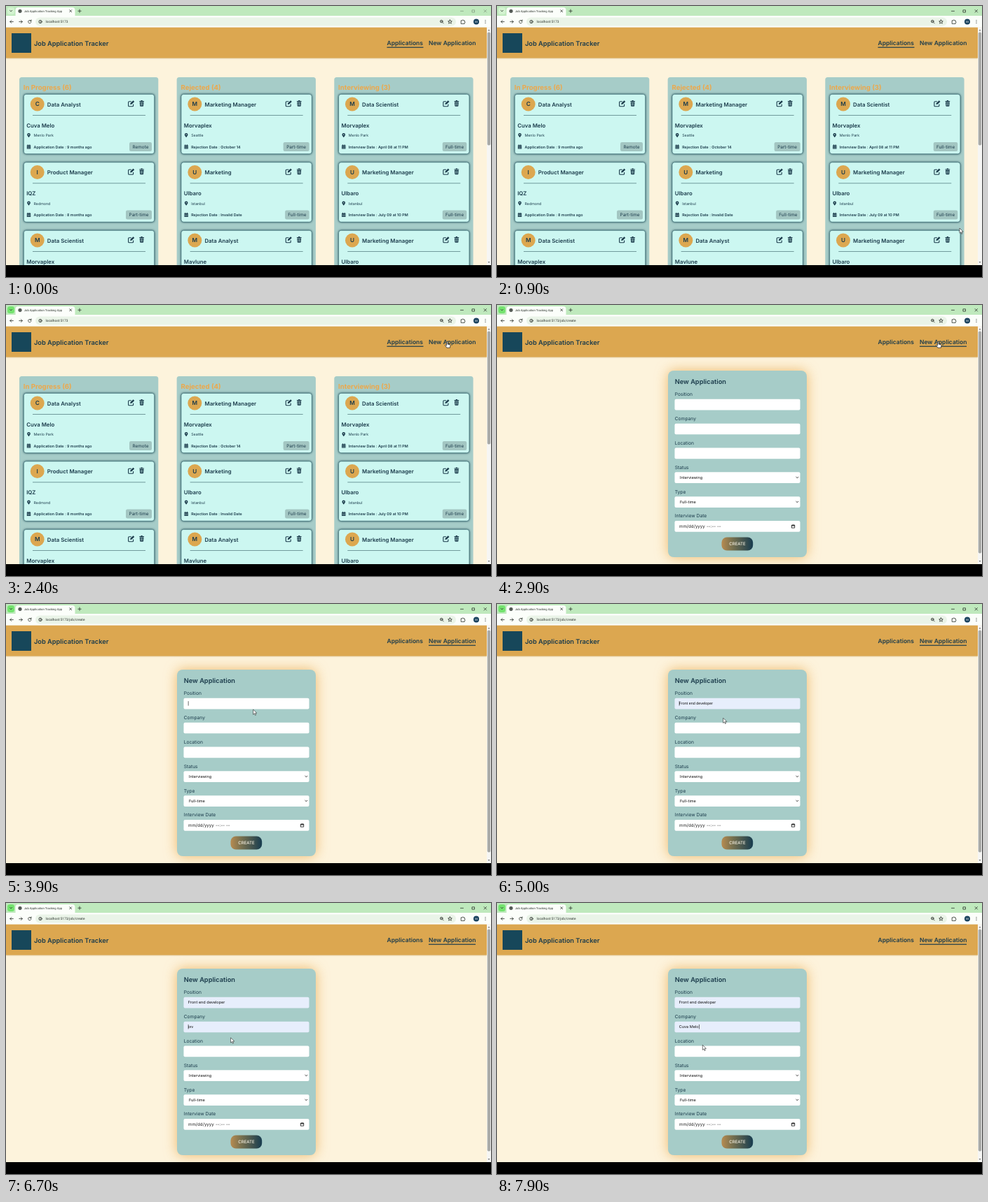
Write an HTML page that moves like this. It is 692 px wide and 388 px high and loops after 8000 ms.

```html
<!DOCTYPE html>
<html lang="en">
<head>
<meta charset="utf-8">
<title>Job Application Tracking App</title>
<style>
  html, body { margin: 0; width: 100%; height: 100%; overflow: hidden; background: #000; }
  svg { display: block; width: 100%; height: 100%; }
  text { font-family: Inter, "Open Sans", sans-serif; fill: #1b3b4b; text-rendering: geometricPrecision; white-space: pre; }
  .chrome { font-family: Roboto, Arial, sans-serif; fill: #2c332d; }
  .title { font-size: 9.25px; font-weight: 600; }
  .nav { font-size: 8.5px; font-weight: 600; }
  .column { font-size: 9.65px; font-weight: 700; fill: #eda84b; }
  .name { font-size: 7.8px; font-weight: 600; }
  .place { font-size: 5.3px; }
  .date { font-size: 5.4px; font-weight: 600; }
  .badge { font-size: 6.35px; text-anchor: middle; }
  .initial { font-size: 8.2px; font-weight: 600; text-anchor: middle; }
  .label { font-size: 6.7px; }
  .value { font-size: 5.55px; fill: #111; }
  .preview { font-family: "Liberation Sans", Arial, sans-serif; font-size: 5.4px; }
  .hint { font-size: 6.2px; fill: #222; }
  .create { font-size: 6.1px; font-weight: 500; fill: #f6f1e4; text-anchor: middle; }
  .card { fill: #ccf7f1; stroke: #3b6a72; stroke-width: .7; filter: drop-shadow(0 0 1.6px #1f4a55); }
  .panel { fill: #a6ccc8; }
  .glow { filter: drop-shadow(0 0 9px rgba(232, 166, 70, .75)); }
  .line { fill: none; stroke: #2c332d; stroke-width: .8; stroke-linecap: round; stroke-linejoin: round; }
</style>
</head>
<body>
<svg id="stage" viewBox="0 0 692 388" preserveAspectRatio="none"></svg>
<script>
const LOOP = 8000, STEP = 100;
const NAVY = '#1b3b4b', ORANGE = '#dca750';

const rect = (x, y, w, h, fill, r = 0, more = '') =>
  `<rect x="${x}" y="${y}" width="${w}" height="${h}" rx="${r}" fill="${fill}" ${more}/>`;
const circle = (x, y, r, fill) => `<circle cx="${x}" cy="${y}" r="${r}" fill="${fill}"/>`;
const text = (x, y, cls, str, more = '') => `<text x="${x}" y="${y}" class="${cls}" ${more}>${str}</text>`;
const line = (d, more = '') => `<path class="line" d="${d}" ${more}/>`;
const icon = (id, x, y) => `<use href="#${id}" x="${x}" y="${y}"/>`;

const defs = `<defs>
  <clipPath id="view"><rect y="30" width="686" height="341"/></clipPath>
  <linearGradient id="button"><stop offset="0" stop-color="#b78b50"/><stop offset=".35" stop-color="#76704f"/>
    <stop offset="1" stop-color="#173c4f"/></linearGradient>
  <g id="edit" fill="${NAVY}"><path d="M0-3H-3.2a1 1 0 0 0-1 1v5a1 1 0 0 0 1 1h5a1 1 0 0 0 1-1V.8" fill="none" stroke="${NAVY}" stroke-width="1.1"/>
    <path d="M-1.7 1.4l.5-2L2.7-4.4l1.7 1.7L.4 1z"/></g>
  <g id="trash" fill="${NAVY}"><path d="M-3.3-3.6h2l.4-.8h1.8l.4.8h2v1h-6.6zM-2.9-2.1h5.8l-.4 5.5a.9.9 0 0 1-.9.8h-3.2a.9.9 0 0 1-.9-.8z"/>
    <path d="M-1.3-1v4M0-1v4M1.3-1v4" stroke="#ccf7f1" stroke-width=".5"/></g>
  <g id="pin"><path fill="${NAVY}" d="M0 3.2C-1.2 1.6-2.3.4-2.3-.8a2.3 2.3 0 0 1 4.6 0C2.3.4 1.2 1.6 0 3.2z"/><circle cy="-.8" r=".8" fill="#ccf7f1"/></g>
  <g id="calendar" fill="${NAVY}"><path d="M-2.7-2.3h1v-.9h.8v.9h1.8v-.9h.8v.9h1v1.2h-5.4zM-2.7-.7h5.4v3.7h-5.4z"/>
    <path d="M-2 .5h4M-2 1.8h4" stroke="#ccf7f1" stroke-width=".5" stroke-dasharray="1 .5"/></g>
  <path id="arrow" d="M0 0v7.2l1.7-1.5 1.1 2.6 1.2-.5-1.1-2.6h2.3z" fill="#fff" stroke="#222" stroke-width=".6"/>
  <path id="hand" d="M-.8.6c0-1 1.6-1 1.6 0v3l3 .7c.6.2.8.6.7 1.2l-.5 3.2H-.6L-2.9 5.500c-.4-.7.5-1.200 1.100-.7l1 .9z" fill="#fff" stroke="#111" stroke-width=".7"/>
  <path id="beam" d="M-1.300-4h2.600M0-4v8M-1.300 4h2.600" fill="none" stroke="#222" stroke-width=".7"/>
</defs>`;

const browser = () => rect(0, 0, 692, 15, '#bfe9bd') +
  rect(2, 2, 10, 10, '#d3f3d0', 3) + rect(2, 2, 10, 10, '#74e36f', 3, 'id="tabMenu"') +
  line('M5.5 6.300l1.600 1.500 1.600-1.500') +
  rect(13.5, 2, 85, 15, '#fbfefa', 4) + circle(20, 7.300, 2.600, '#555c57') +
  text(25.700, 9, 'chrome', 'Job Application Tracking App', 'font-size="4.2"') +
  line('M90.700 5.700l3 3m0-3l-3 3M102.800 7.200h4.400M105 5v4.400') +
  `<g id="controls">${line('M648.500 7.300h4M665.300 5.800h3.200v3.200h-3.200zM682 5.500l3.500 3.500m0-3.500l-3.500 3.500')}</g>` +
  rect(0, 14, 692, 16.5, '#fbfefa') + rect(42, 16.5, 600, 12, '#eaf4e8', 6) +
  line('M10.300 22.500H5.800m2-2l-2 2 2 2M18.800 22.500h4.500m-2-2l2 2-2 2') +
  line('M35.800 21.500a2.200 2.200 0 1 0 .2 1.600M36 19.800v1.800h-1.800') +
  `<circle class="line" cx="49" cy="22.500" r="2.200"/>` + line('M49 22.300v1.300M49 21.200v.1') +
  text(56.5, 24.300, 'chrome', '', 'font-size="4.85" id="url"') +
  `<circle class="line" cx="621.300" cy="22" r="1.800"/>` + line('M622.700 23.400l1.500 1.500M620.500 22h1.600') +
  line('M633.500 19.800l.8 1.800 2 .2-1.500 1.300.5 2-1.800-1.100-1.800 1.100.5-2-1.500-1.300 2-.2z', 'stroke-width=".6"') +
  line('M649.600 20.800h1.400a.9.9 0 0 1 1.800 0h1.400v1.500a.9.9 0 0 1 0 1.800v1.300h-4.600z') +
  circle(671, 22.500, 4, '#17405c') +
  text(671, 24, 'chrome', 'M', 'style="font-size:4px;fill:#fff" text-anchor="middle"') +
  [20.500, 22.500, 24.500].map(y => circle(684, y, .6, '#2c332d')).join('');

const header = () => rect(0, 30.5, 686, 44, ORANGE, 0, 'style="filter:drop-shadow(0 .5px 1px #c9a86a)"') +
  rect(8, 39, 28, 28, '#17475a') + text(40, 56.700, 'title', 'Job Application Tracker') +
  text(543.5, 55.5, 'nav', 'Applications') + text(603, 55.5, 'nav', 'New Application') +
  rect(543.5, 58.600, 52, 1.200, NAVY, 0, 'id="underline"');

const columns = [
  ['In Progress (6)', 'Application Date : ', [
    ['Data Analyst', 'Cuva Melo', 'Menlo Park', '9 months ago', 'Remote'],
    ['Product Manager', 'IQZ', 'Redmond', '8 months ago', 'Part-time'],
    ['Data Scientist', 'Morvaplex']]],
  ['Rejected (4)', 'Rejection Date : ', [
    ['Marketing Manager', 'Morvaplex', 'Seattle', 'October 14', 'Part-time'],
    ['Marketing', 'Ulbaro', 'Istanbul', 'Invalid Date', 'Full-time'],
    ['Data Analyst', 'Mavlune']]],
  ['Interviewing (3)', 'Interview Date : ', [
    ['Data Scientist', 'Morvaplex', 'Menlo Park', 'April 08 at 11 PM', 'Full-time'],
    ['Marketing Manager', 'Ulbaro', 'Istanbul', 'July 09 at 10 PM', 'Full-time'],
    ['Marketing Manager', 'Ulbaro']]]
];
const badgeWidth = { 'Remote': 32, 'Part-time': 37, 'Full-time': 34.5 };

function card([job, company, place, when, type], prefix, row) {
  const w = badgeWidth[type];
  return `<g transform="translate(25 ${126 + row * 97.5})">
    <rect class="card" x=".3" y=".3" width="186.400" height="85.500" rx="3.500"/>` +
    circle(19.700, 14.500, 10, ORANGE) + text(19.700, 17.400, 'initial', company[0]) +
    text(33.800, 17.500, 'name', job) + icon('edit', 153.800, 13.700) + icon('trash', 168.600, 13.500) +
    rect(13, 30, 161, .7, '#4b7378') + text(4.200, 47.800, 'name', company) +
    (type ? icon('pin', 7.500, 59) + text(14.500, 61, 'place', place) +
      icon('calendar', 7.500, 75.500) + text(14.500, 77.500, 'date', prefix + when) +
      rect(183 - w, 69, w, 13, '#a3c6c2', 2.200) + text(183 - w / 2, 77.800, 'badge', type) : '') + '</g>';
}

const board = () => columns.map(([heading, prefix, cards], i) =>
  `<g transform="translate(${i * 224.650} 0)"><rect class="panel" x="19" y="102" width="198.300" height="280" rx="3.500"/>` +
  text(24.800, 120.200, 'column', heading) + cards.map((c, row) => card(c, prefix, row)).join('') + '</g>').join('');

const fields = ['Position', 'Company', 'Location', 'Status', 'Type', 'Interview Date'];
const fieldTop = i => 134.800 + i * 34.850;
const chevron = y => line(`M426.800 ${y - .8}l1.500 1.500 1.500-1.500`, 'style="stroke:#111"');

const form = () => '<rect class="panel glow" x="244" y="94" width="198" height="267" rx="8"/>' +
  text(253.700, 113.300, 'title', 'New Application') +
  fields.map((name, i) => text(253.700, 130.300 + i * 34.800, 'label', name) +
    rect(253.5, fieldTop(i), 179, 15.700, '#fff', 2, `id="field${i}"`)).join('') +
  text(259.700, 144, 'value', '', 'id="position"') + text(259.700, 178.700, 'value', '', 'id="company"') +
  text(261, 248.500, 'value', 'Interviewing') + chevron(247) +
  text(261, 283.700, 'value', 'Full-time') + chevron(282) +
  text(260, 318.900, 'hint', 'mm/dd/yyyy') + text(299, 318.900, 'hint', '--:-- --') +
  line('M420.700 315.300h4v3.800h-4zM420.700 316h4M421.800 314.600v.5M423.600 314.600v.5', 'style="stroke:#111"') +
  rect(320.5, 332.5, 44.700, 19, 'url(#button)', 7.500) + text(343, 344.200, 'create', 'CREATE') +
  rect(259.5, 0, .6, 6.5, '#111', 0, 'id="caret"');

document.getElementById('stage').innerHTML = defs + rect(0, 0, 692, 371, '#fdf3dc') +
  `<g clip-path="url(#view)"><g id="board">${board()}</g><g id="form">${form()}</g>${header()}</g>` + browser() +
  rect(686, 30.5, 6, 340.5, '#f6f6f4') + rect(686.800, 37.5, 4.400, 162, '#a9aaa8', 2, 'id="thumb"') +
  '<path d="M687.500 35.500l1.500-2 1.500 2zM687.500 366l1.500 2 1.500-2z" fill="#777"/>' +
  rect(0, 371, 692, 17, '#000') + '<use id="cursor"/>';

const el = id => document.getElementById(id);
const set = (id, attrs) => { for (const k in attrs) el(id).setAttribute(k, attrs[k]); };
const show = (id, on) => el(id).style.display = on ? '' : 'none';

// time, x, y of the pointer
const path = [
  [0, 676, 362], [900, 660, 318], [1700, 622, 89.500], [1800, 622, 89.500], [2400, 629.500, 52.500],
  [2900, 629.500, 52.500], [3600, 355.500, 148], [3700, 355.500, 148], [3900, 352.700, 151], [4500, 352.700, 151],
  [4800, 321.500, 162.500], [4900, 321.500, 162.500], [5000, 322.700, 163.200], [5100, 321.800, 163], [5800, 321.800, 163],
  [6200, 321, 177], [6500, 321, 177], [6700, 320.600, 192.800], [7100, 320.300, 202.800],
  [7700, 320.300, 202.800], [7900, 293.300, 203.200], [LOOP, 293.300, 203.200]
];
// time, caret x, field; no field hides it
const carets = [[0], [3600, 259.800, 0], [4200], [4700, 259.800, 0], [5300], [5500, 313.500, 0], [5900],
  [6200, 259.800, 1], [6800], [7300, 259.800, 1], [7600, 288.300, 1]];
// time, text, is a preview
const positions = [[0, ''], [4700, 'Front end developer', true], [5500, 'Front end developer']];
const companies = [[0, ''], [6600, 'orv', true], [6900, 'Cuva Melo', true], [7600, 'Cuva Melo']];

const current = (steps, t) => steps.filter(s => s[0] <= t).pop();

function pointer(t) {
  const i = path.findIndex(p => p[0] > t), [t0, x0, y0] = path[i - 1], [t1, x1, y1] = path[i];
  const k = (t - t0) / (t1 - t0), e = k * k * (3 - 2 * k);
  return [x0 + (x1 - x0) * e, y0 + (y1 - y0) * e];
}

function pointerShape(x, y, onForm) {
  if (x > 603 && x < 670 && y > 46 && y < 60) return 'hand';
  const overField = [0, 1, 2].some(i => y > fieldTop(i) && y < fieldTop(i) + 15.700);
  return onForm && x > 253 && x < 433 && overField ? 'beam' : 'arrow';
}

function fill(id, field, [, str, preview], t) {
  el(id).textContent = str;
  el(id).setAttribute('class', preview ? 'value preview' : 'value');
  set(field, { fill: str ? '#e7eefc' : '#fff' });
}

function render(time) {
  const t = Math.floor(time % LOOP / STEP) * STEP, onForm = t >= 2900;
  show('board', !onForm);
  show('form', onForm);
  show('tabMenu', t >= 1000);
  el('controls').style.opacity = t < 500 ? .4 : 1;
  el('url').textContent = 'localhost:5173' + (onForm ? '/job/create' : '');
  set('underline', onForm ? { x: 603, width: 67 } : { x: 543.5, width: 52 });
  set('thumb', { height: onForm ? 318 : 162 });

  fill('position', 'field0', current(positions, t));
  fill('company', 'field1', current(companies, t));
  const [, caretX, field] = current(carets, t);
  show('caret', field !== undefined);
  if (field !== undefined) set('caret', { x: caretX, y: fieldTop(field) + 4.300 });

  const [x, y] = pointer(t);
  show('cursor', t >= 100);
  set('cursor', { href: '#' + pointerShape(x, y, onForm), x, y });
}

const start = performance.now();
(function tick() {
  render(performance.now() - start);
  requestAnimationFrame(tick);
})();
</script>
</body>
</html>
```
